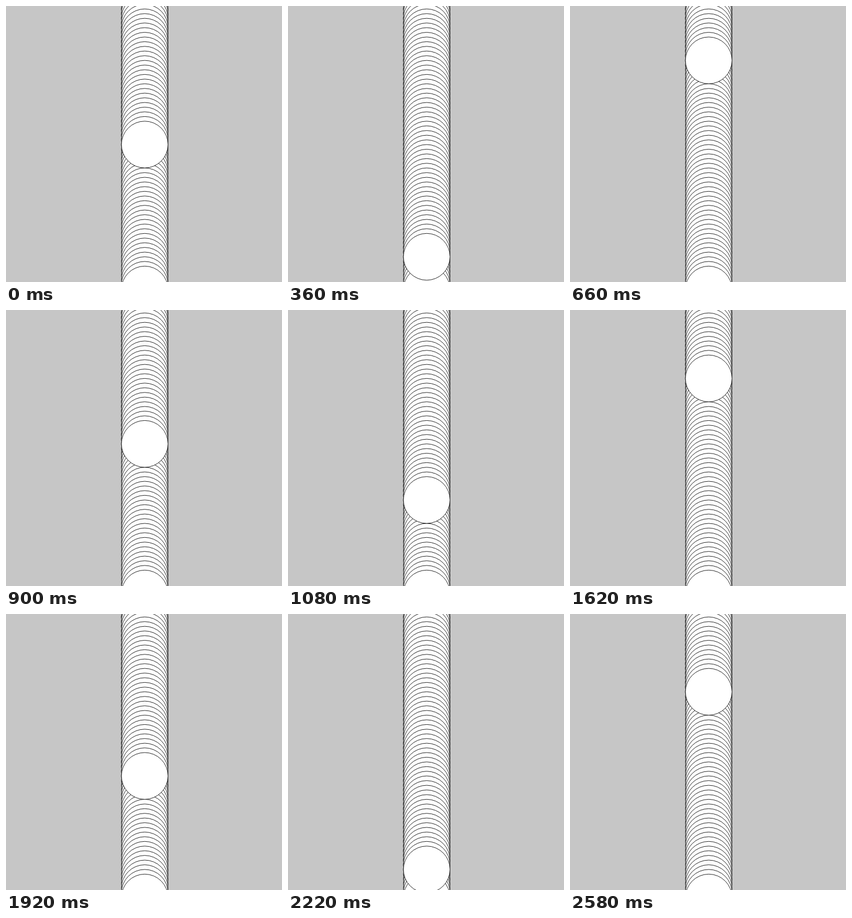
Animation, 500 px wide and 498 px high, one loop 2640 ms. Source, as an HTML page with a canvas:

```html
<!DOCTYPE html>
<html lang="en">
<head>
<meta charset="utf-8">
<title>Falling disc</title>
<style>
  html, body { margin: 0; width: 100%; height: 100%; overflow: hidden; background: #c6c6c6; }
  canvas { display: block; }
</style>
</head>
<body>
<canvas id="stage" width="500" height="498"></canvas>
<script>
const ctx = document.getElementById('stage').getContext('2d');
const LOOP = 2640, STEP = 60;
const COUNT = 62, GAP = 8.4375, TOP = -3.1;
const CX = 251.3, RADIUS = 42.2;

ctx.lineWidth = 0.85;
ctx.strokeStyle = '#000';

function disc(i) {
  ctx.beginPath();
  ctx.arc(CX, TOP + i * GAP, RADIUS, 0, Math.PI * 2);
  ctx.fillStyle = '#fff';
  ctx.fill();
  ctx.stroke();
}

function column(last) {
  for (let i = 0; i <= last; i++) disc(i);
}

// Four discs per step, with one extra early in the second fall.
function position(step) {
  return (30 + step * 4 + (step >= 12 ? 1 : 0)) % COUNT;
}

function draw(step) {
  ctx.fillStyle = '#c6c6c6';
  ctx.fillRect(0, 0, 500, 498);
  column(COUNT - 1);
  column(position(step));
}

let shown = 0;
draw(shown);

const start = performance.now();
function tick() {
  const step = Math.floor(((performance.now() - start) % LOOP) / STEP);
  if (step !== shown) draw(shown = step);
  requestAnimationFrame(tick);
}
requestAnimationFrame(tick);
</script>
</body>
</html>
```
